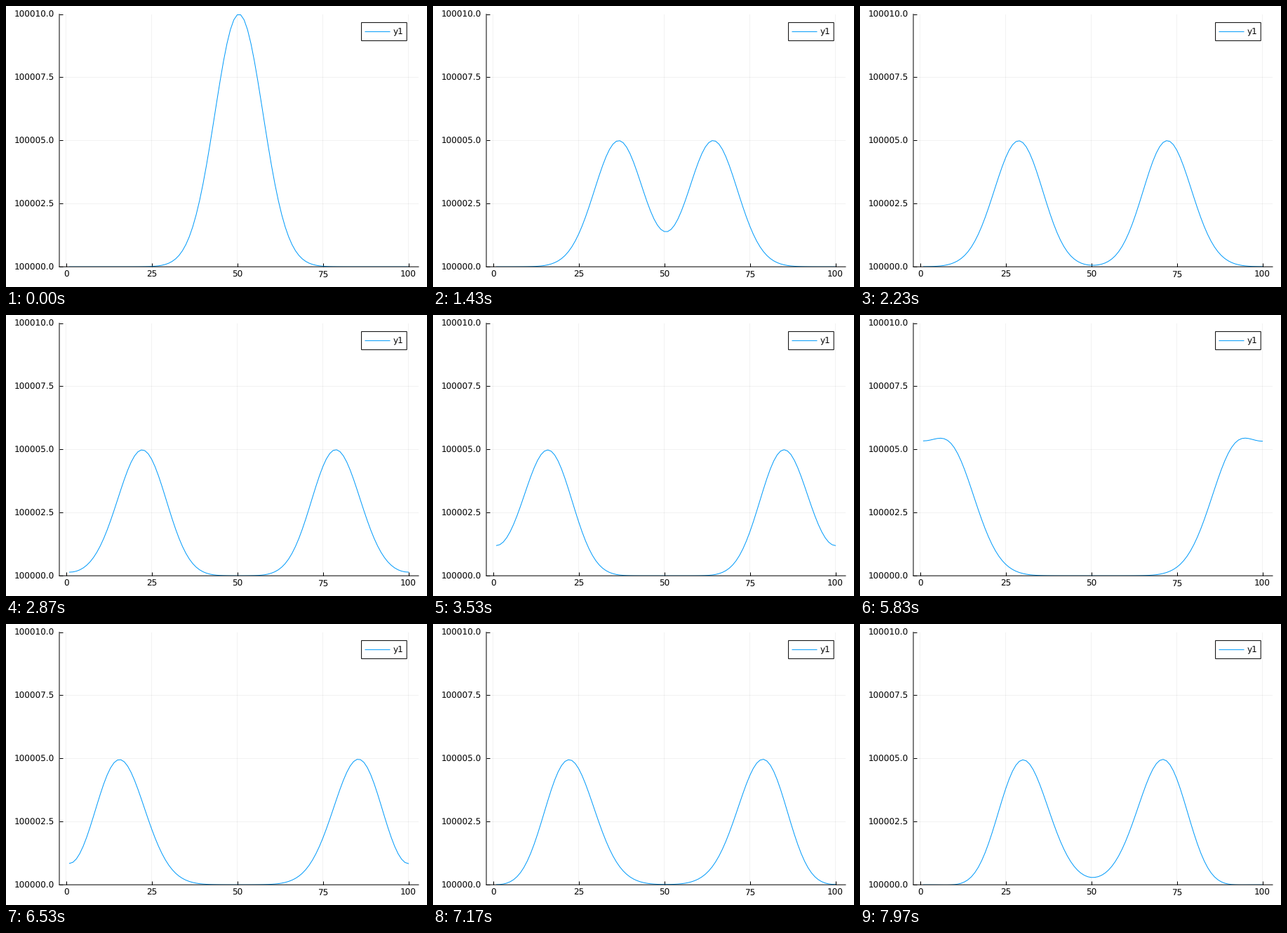
Write a matplotlib script that moves like this. It is 600 px wide and 400 px high and loops after 8000 ms.

```python
import numpy as np
import matplotlib.pyplot as plt
from matplotlib.animation import FuncAnimation
from matplotlib.lines import Line2D
from matplotlib.patches import Rectangle
from matplotlib.transforms import Affine2D

W, H = 600, 400
FRAMES = 240
PX = 0.72            # one pixel in points at 100 dpi
BLUE = "#009AFA"
plt.rcParams["font.family"] = "DejaVu Sans"
plt.rcParams["font.size"] = 12 * PX
plt.rcParams["text.hinting"] = "none"

# Pressure pulse between two walls, as cosine modes of a
# central-difference wave equation (short waves lag behind)
BASE, PEAK, SIGMA = 100000, 10, 7.03
SPEED = 0.332        # cells per frame
x = np.arange(1, 101)
length = x[-1] - x[0]
k = np.arange(0, 80, 2) * np.pi / length
amp = PEAK * SIGMA * np.sqrt(2 * np.pi) / length * np.exp(-(k * SIGMA) ** 2 / 2)
amp[1:] *= 2
modes = np.cos(np.outer(x - 50.5, k))
damping = np.where(x < 50.5, 0.08, 0.04)


def pressure(n):
    dist = SPEED * n
    swing = amp * np.cos(np.sin(k) * dist)
    decay = np.exp(-np.outer(damping, k ** 4) * dist)
    return BASE + (modes * decay) @ swing


fig = plt.figure(figsize=(W / 100, H / 100), dpi=100, facecolor="white")
left, right, top, bottom = 76, 588, 11.6, 371.2
ax = fig.add_axes([left / W, 1 - bottom / H, (right - left) / W, (bottom - top) / H])
ax.set_xlim(-1.97, 102.97)
ax.set_ylim(BASE, BASE + PEAK)
ax.set_xticks(range(0, 101, 25))
yticks = BASE + np.arange(0, 10.1, 2.5)
ax.set_yticks(yticks, [f"{v:.1f}" for v in yticks])
ax.tick_params(direction="in", length=5 * PX, width=PX)
ax.tick_params(axis="x", pad=6 * PX)
ax.tick_params(axis="y", pad=7.5 * PX)
ax.grid(color="black", alpha=0.1, linewidth=0.5 * PX, snap=False)
ax.set_axisbelow(True)
for side in ("top", "right"):
    ax.spines[side].set_visible(False)
for side in ("left", "bottom"):
    ax.spines[side].set(linewidth=PX, snap=False)

curve, = ax.plot(x, pressure(0), color=BLUE, linewidth=PX)

# Legend, placed in pixels from the top left corner
pixels = Affine2D().scale(1 / W, -1 / H).translate(0, 1) + fig.transFigure
fig.add_artist(Rectangle((506.6, 23.6), 64.6, 25.8, transform=pixels, snap=False,
                         facecolor="white", edgecolor="black", linewidth=PX))
fig.add_artist(Line2D([512, 547], [36.6, 36.6], transform=pixels, snap=False,
                      color=BLUE, linewidth=PX))
fig.text(552, 40.8, "y1", transform=pixels)


def update(n):
    curve.set_ydata(pressure(n))
    return curve,


anim = FuncAnimation(fig, update, frames=FRAMES, interval=8000 / FRAMES,
                     repeat=True, repeat_delay=0)
plt.show()
```
